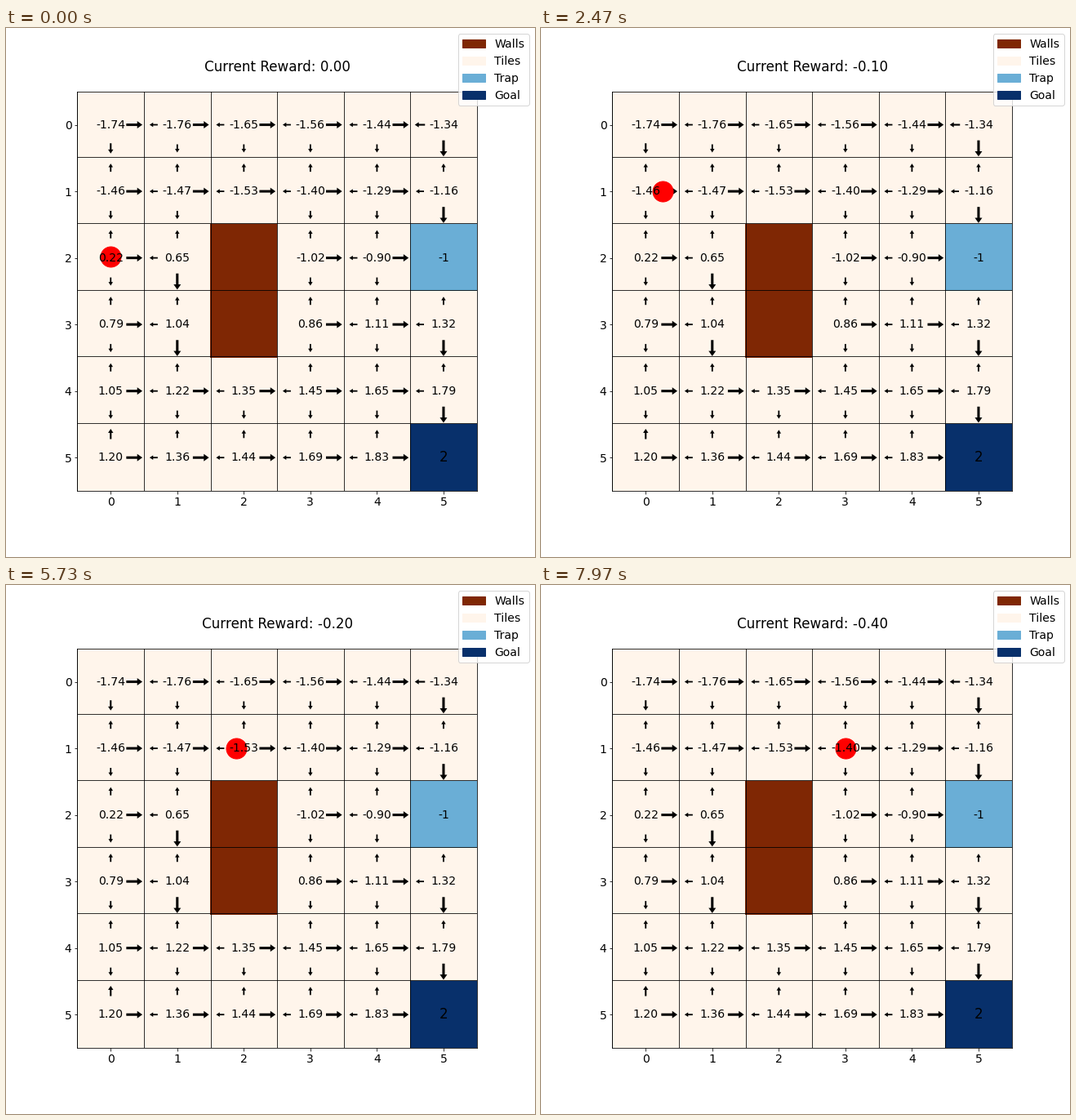
A matplotlib script for the animation above (8000 ms loop, 648 px wide and 648 px high).

```python
import numpy as np
import matplotlib.pyplot as plt
from matplotlib.animation import FuncAnimation
from matplotlib.collections import PolyCollection
from matplotlib.colors import to_rgb
from matplotlib.patches import Patch

plt.rcParams.update({"font.family": "DejaVu Sans", "font.size": 14})

N = 6
STAGE = 648
CELL = 0.755 * STAGE / N          # pixels per grid cell
STEP = 60                         # frames per move
FRAMES = 240
COLORS = {"Walls": "#7f2704", "Tiles": "#fff5eb",
          "Trap": "#6aaed6", "Goal": "#08306b"}
WALLS = {(2, 2), (3, 2)}
TRAP, GOAL = (2, 5), (5, 5)
VALUES = [
    [-1.74, -1.76, -1.65, -1.56, -1.44, -1.34],
    [-1.46, -1.47, -1.53, -1.40, -1.29, -1.16],
    [0.22, 0.65, 0, -1.02, -0.90, 0],
    [0.79, 1.04, 0, 0.86, 1.11, 1.32],
    [1.05, 1.22, 1.35, 1.45, 1.65, 1.79],
    [1.20, 1.36, 1.44, 1.69, 1.83, 0],
]
MOVES = {"right": (0, 1), "down": (1, 0), "left": (0, -1), "up": (-1, 0)}
PATH = [(0, 2), (0, 1), (1, 1), (2, 1), (3, 1), (4, 1)]


def kind(cell):
    if cell in WALLS:
        return "Walls"
    return {TRAP: "Trap", GOAL: "Goal"}.get(cell, "Tiles")


def is_open(r, c):
    return 0 <= r < N and 0 <= c < N and (r, c) not in WALLS


def arrow(r, c, move, length):
    """Arrow polygon in data units, centred between cell middle and edge."""
    shaft = (0.13 * length + 0.5) / 2
    head = (0.36 * length + 1.9) / 2
    tip = length / 2
    neck = tip - (0.2 * length + 2.4)
    along = np.array([-tip, neck, neck, tip, neck, neck, -tip])
    across = np.array([shaft, shaft, head, 0, -head, -shaft, -shaft])
    along = along / CELL + 0.355
    across = across / CELL
    dr, dc = move
    return np.column_stack([c + along * dc + across * dr,
                            r + along * dr + across * dc])


def cell_arrows(r, c):
    names = [m for m, (dr, dc) in MOVES.items() if is_open(r + dr, c + dc)]
    best = "right" if "right" in names else "down"
    small = 12.5 if len(names) == 2 else 10
    return [arrow(r, c, MOVES[m], 19.7 if m == best else small) for m in names]


fig = plt.figure(figsize=(9, 9), dpi=72)
ax = fig.add_axes([0.135, 0.125, 0.755, 0.755])

grid = np.array([[to_rgb(COLORS[kind((r, c))]) for c in range(N)]
                 for r in range(N)])
ax.imshow(grid, interpolation="nearest", aspect="auto")

arrows = []
for r in range(N):
    for c in range(N):
        k = kind((r, c))
        if k == "Walls":
            continue
        label, size = f"{VALUES[r][c]:.2f}", 14
        if k == "Trap":
            label = "-1"
        elif k == "Goal":
            label, size = "2", 16.8
        else:
            arrows += cell_arrows(r, c)
        ax.text(c, r, label, size=size, ha="center", va="center")
ax.add_collection(PolyCollection(arrows, facecolor="black", linewidth=0,
                                 zorder=1))

ax.set_xticks(range(N))
ax.set_yticks(range(N))
ax.set_xticks(np.arange(-0.5, N), minor=True)
ax.set_yticks(np.arange(0.48, N - 1), minor=True)
ax.grid(which="minor", color="black", linestyle="-", linewidth=0.8)
ax.tick_params(which="minor", length=0)
ax.set_xlim(-0.5, N - 0.5)
ax.set_ylim(N - 0.5, -0.5)

fig.legend(handles=[Patch(color=v, label=k) for k, v in COLORS.items()],
           loc="upper right")
title = ax.set_title("Current Reward: 0.00", pad=25)
agent, = ax.plot([], [], "o", color="red", markersize=25)


def update(n):
    leg, step = divmod(n + 1, STEP)
    u = step / (STEP - 1)
    (x0, y0), (x1, y1) = PATH[leg], PATH[leg + 1]
    agent.set_data([x0 + (x1 - x0) * u], [y0 + (y1 - y0) * u])
    title.set_text(f"Current Reward: {-leg / 10:.2f}")
    return agent, title


anim = FuncAnimation(fig, update, frames=FRAMES, interval=8000 / FRAMES,
                     init_func=lambda: update(0), repeat=True, repeat_delay=0)
plt.show()
```
